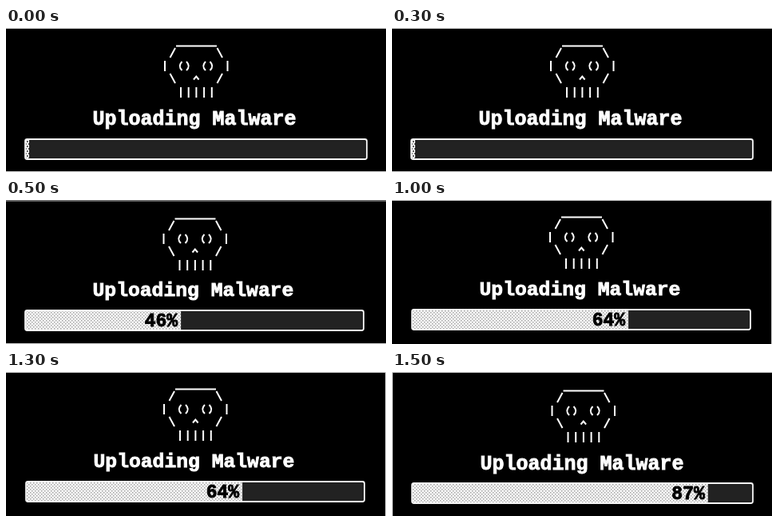
Write an HTML page that moves like this. It is 476 px wide and 180 px high and loops after 2000 ms.

```html
<!DOCTYPE html>
<html lang="en">
<head>
<meta charset="utf-8">
<title>Uploading</title>
<style>
html, body { margin: 0; width: 100%; height: 100%; overflow: hidden; background: #000; }
svg { display: block; width: 100vw; height: 100vh; }
text { font-family: "Liberation Mono", monospace; font-weight: bold; stroke-width: .9; white-space: pre; }
#title { fill: #fff; stroke: #fff; }
#label { fill: #000; stroke: #000; text-anchor: end; font-size: 23px; }
#skull { fill: none; stroke: #fff; stroke-width: 2; }
#edge { fill: none; stroke: #ccc; stroke-width: 1; }
</style>
</head>
<body>
<svg viewBox="0 0 476 180" preserveAspectRatio="none">
  <defs>
    <pattern id="dots" width="4" height="4" patternUnits="userSpaceOnUse">
      <rect width="4" height="4" fill="#f8f8f8"/>
      <path d="M0 0h1.4v1.4h-1.4zM2 2h1.4v1.4h-1.4z" fill="#a0a0a0"/>
    </pattern>
    <pattern id="grain" width="4" height="6" patternUnits="userSpaceOnUse">
      <rect width="4" height="6" fill="#f8f8f8"/>
      <path d="M0 0h1.6v2h-1.6zM2 3h1.6v2h-1.6z" fill="#444"/>
    </pattern>
  </defs>
  <rect width="476" height="180"/>
  <path id="edge"/>
  <g id="skull">
    <path d="M213 22.5H264M212 25L205.5 37M264.5 25L271 37"/>
    <path d="M199 41V54M277.5 41V54"/>
    <path id="eye" d="M220.5 42Q215 47.5 220.5 53M226 42Q231.5 47.5 226 53"/>
    <use href="#eye" x="29.5"/>
    <path d="M205.5 57L212 69M271 57L264.5 69M235 64.5L238.3 60.5L241.6 64.5"/>
    <path d="M219 74V87M228.7 74V87M238.4 74V87M248.1 74V87M257.8 74V87"/>
  </g>
  <text id="title">Uploading Malware</text>
  <rect id="track" height="25" rx="2" fill="#222"/>
  <rect id="fill" height="24"/>
  <rect id="frame" height="25" rx="2.5" fill="none" stroke="#f4f4f4" stroke-width="1.8"/>
  <text id="label"></text>
</svg>
<script>
const LOOP = 2000, STEP = 500;
const TOP = "M0 .5H476", BOTTOM = "M0 179.5H476", LEFT = "M.5 0V180", RIGHT = "M475.5 0V180";
// The whole screen jitters slightly with every progress update.
const steps = [
  { pct: 1,  skull: [0, 0],    title: [108.5, 121, 25],   bar: [23, 138, 430], edge: TOP + BOTTOM },
  { pct: 46, skull: [-1.5, 1], title: [108.5, 120, 24.7], bar: [23, 137, 426], edge: "M0 1H476" + BOTTOM },
  { pct: 64, skull: [-1, -1],  title: [109.5, 119, 24.7], bar: [24, 136, 426], edge: TOP + RIGHT },
  { pct: 87, skull: [1.5, 1],  title: [110.5, 122, 25],   bar: [24, 138, 429], edge: TOP + LEFT }
];
const $ = id => document.getElementById(id);
const set = (id, attrs) => {
  for (const k in attrs) $(id).setAttribute(k, attrs[k]);
};
let shown = -1;

function draw(i) {
  const { pct, skull, title, bar, edge } = steps[i];
  const [x, y, w] = bar;
  const started = pct > 1;
  const end = started ? x + 2 + (w - 4) * pct / 100 : x + 6;
  set("skull", { transform: `translate(${skull})` });
  set("title", { x: title[0], y: title[1], "font-size": title[2] });
  for (const id of ["track", "frame"]) set(id, { x: x + 1, y: y + 1, width: w - 2 });
  set("fill", { x: x + 1.5, y: y + 1.5, width: end - x - 1.5,
    fill: started ? "url(#dots)" : "url(#grain)" });
  set("label", { x: end - 4, y: y + 20.5 });
  $("label").textContent = started ? pct + "%" : "";
  set("edge", { d: edge });
}

function tick() {
  const i = Math.floor(performance.now() % LOOP / STEP);
  if (i !== shown) draw(shown = i);
  requestAnimationFrame(tick);
}
tick();
</script>
</body>
</html>
```
